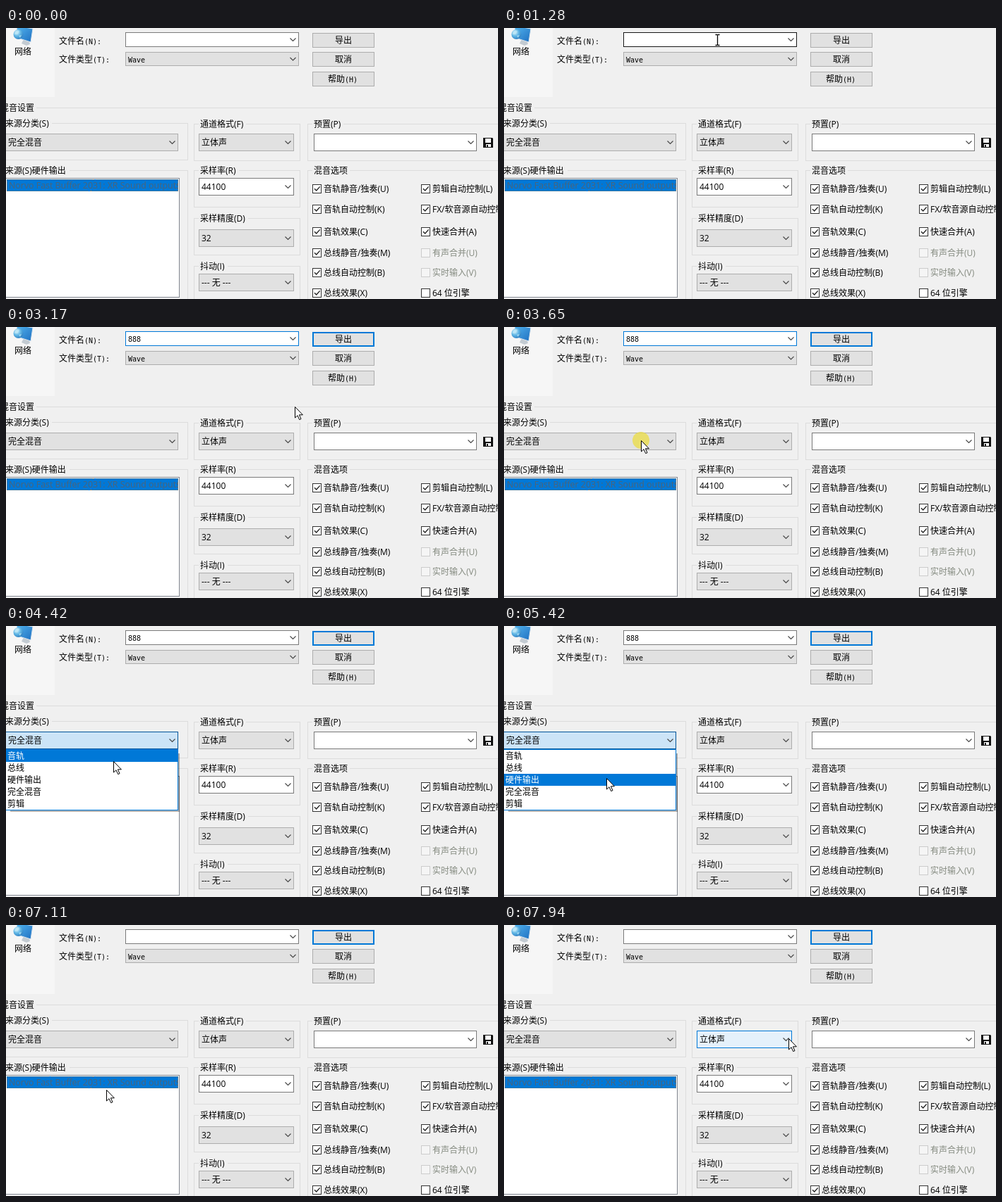
Recreate the animation shown at these times as an HTML page. Size 697 by 385 pixels, loop 8 s.

```html
<!DOCTYPE html>
<html lang="zh-CN">
<head>
<meta charset="utf-8">
<title>导出</title>
<style>
html, body { margin: 0; width: 100%; height: 100%; overflow: hidden; background: #f0f0f0; }
svg { display: block; width: 697px; height: 385px; }
text { font: 12px "Open Sans", "Noto Sans CJK SC", "Noto Sans CJK", "Noto Sans CJK JP", sans-serif; fill: #000; white-space: pre; }
text.mono { font: 12px "Noto Sans CJK SC", "Noto Sans CJK", "Noto Sans CJK JP", sans-serif; }
.mono tspan { font: 10px "DejaVu Sans Mono", monospace; }
rect { shape-rendering: crispEdges; }
</style>
</head>
<body>
<svg id="stage" viewBox="0 0 697 385" xmlns="http://www.w3.org/2000/svg">
  <defs>
    <clipPath id="rowClip"><rect x="0" y="214" width="244" height="20"/></clipPath>
    <radialGradient id="globe" cx=".35" cy=".3" r=".8">
      <stop offset="0" stop-color="#d9f3fd"/><stop offset=".5" stop-color="#5db4e4"/><stop offset="1" stop-color="#2a78bd"/>
    </radialGradient>
    <linearGradient id="screen" x2="1" y2="1">
      <stop offset="0" stop-color="#54b6f0"/><stop offset="1" stop-color="#1f6fc0"/>
    </linearGradient>
  </defs>
  <g id="base"></g>
  <g id="list"></g>
  <g id="top"></g>
</svg>
<script>
const NS = 'http://www.w3.org/2000/svg';
const $ = id => document.getElementById(id);
let layer = $('base');

function el(tag, attrs, parent = layer) {
  const node = document.createElementNS(NS, tag);
  set(node, attrs);
  parent.appendChild(node);
  return node;
}
function set(node, attrs) {
  for (const k in attrs) node.setAttribute(k, attrs[k]);
}
const show = (node, on) => node.setAttribute('visibility', on ? 'visible' : 'hidden');

// Text placed by its vertical middle, on a whole-pixel baseline
function text(x, mid, str, attrs = {}) {
  const node = el('text', { x, y: Math.round(mid + 4.5), ...attrs });
  node.textContent = str;
  return node;
}
// Text in which the Latin part has a fixed pitch
function mono(x, mid, cjk, latin) {
  const node = text(x, mid, cjk, { class: 'mono' });
  const tail = el('tspan', {}, node);
  tail.textContent = latin;
  return tail;
}
// Rectangle with a one pixel border inside x..x2, y..y2
const box = (x, y, x2, y2, fill, stroke) =>
  el('rect', { x: x + .5, y: y + .5, width: x2 - x - 1, height: y2 - y - 1, fill, stroke });
const line = d => el('path', { d, fill: 'none', stroke: '#dcdcdc', 'shape-rendering': 'crispEdges' });
const chevron = (x, y) =>
  el('path', { d: `M${x - 4} ${y - 2}l4 4 4-4`, fill: 'none', stroke: '#444', 'stroke-width': 1.1 });

function combo(x, y, x2, y2, label, white) {
  const frame = box(x, y, x2, y2, white ? '#fff' : '#e1e1e1', white ? '#7a7a7a' : '#adadad');
  const mid = (y + y2) / 2;
  chevron(x2 - 8.5, mid);
  text(Math.max(x, -1) + 4, mid, label);
  return frame;
}
function group(x, y, x2, y2, label, labelEnd) {
  line(`M${x + 7} ${y + .5}H${x + .5}V${y2 + .5}H${x2 + .5}V${y + .5}H${labelEnd + 3}`);
  text(x + 9, y, label);
}
function check(x, mid, label, state = 'on') {
  const off = state === 'disabled';
  box(x, mid - 6.5, x + 13, mid + 6.5, off ? '#f5f5f5' : '#fff', off ? '#ccc' : '#333');
  if (state === 'on')
    el('path', { d: `M${x + 3} ${mid - .2}l2.7 2.7 5-5.6`, fill: 'none', stroke: '#222', 'stroke-width': 1.4 });
  text(x + 16, mid, label, off ? { style: 'fill:#858b80' } : {});
}

// Side bar with the network icon
el('rect', { x: 0, y: 0, width: 69, height: 98, fill: '#f6f6f6' });
el('path', { d: 'M25 16l8 3 1 4-5 2-7-3z', fill: '#c3cbd2' });
el('path', { d: 'M15-3L38 1 35 20 16 14z', fill: 'url(#screen)', stroke: '#dce6ee' });
el('circle', { cx: 17.5, cy: 9, r: 7, fill: 'url(#globe)' });
el('path', { d: 'M13 5q4-3 6 0l-3 4-4 0zM18 11l4-1-2 4z', fill: '#b9e6f6', opacity: .75 });
text(12, 33.5, '网络');

// File name and type
mono(75, 18, '文件名', '(N):');
mono(75, 44, '文件类型', '(T):');
const field = combo(169, 6, 415, 27, '', true);
const typed = mono(173, 16.5, '', '');
const caret = el('rect', { x: 191, y: 10, width: 1, height: 13, fill: '#000' });
combo(169, 34, 415, 54, '');
mono(173, 44, '', 'Wave');

// Buttons
const button = (y, y2) => box(434, y, 522, y2, '#e1e1e1', '#adadad');
const exportBtn = button(7, 28);
button(34, 55);
button(62, 83);
mono(466, 17, '导出', '');
mono(466, 44.5, '取消', '');
mono(456, 72, '帮助', '(H)');

// Groups
text(-8, 113, '混音设置');
line('M43 113.5H697');
group(-10, 135, 257, 187, '来源分类(S)', 62);
group(-10, 202, 257, 390, '来源(S)硬件输出', 87);
group(266, 136, 416, 188, '通道格式(F)', 337);
group(266, 202, 416, 254, '采样率(R)', 327);
group(266, 270, 416, 322, '采样精度(D)', 340);
group(266, 338, 416, 390, '抖动(I)', 311);
group(427, 136, 710, 188, '预置(P)', 475);
group(427, 202, 710, 390, '混音选项', 484);

const source = combo(-5, 150, 244, 175, '完全混音');
const format = combo(273, 150, 408, 175, '立体声');
combo(273, 213, 408, 238, '44100', true);
combo(273, 286, 408, 311, '32');
combo(273, 349, 408, 374, '--- 无 ---');
combo(436, 150, 667, 175, '', true);

// Disk button
el('path', { d: 'M676 156H689L690 157V170H676z', fill: '#111' });
el('rect', { x: 679, y: 157, width: 8, height: 6, fill: '#fff' });
el('rect', { x: 680, y: 165, width: 7, height: 4, fill: '#fff' });
el('rect', { x: 681, y: 166, width: 2, height: 3, fill: '#111' });

// Output list
box(-5, 213, 246, 383, '#fff', '#828790');
const row = el('g', { 'clip-path': 'url(#rowClip)' });
el('rect', { x: 1, y: 215, width: 243, height: 17, fill: '#0078d7' }, row);
el('rect', { x: 1.5, y: 215.5, width: 242, height: 16, fill: 'none', stroke: '#c97a2a', 'stroke-dasharray': '1 1', opacity: .6 }, row);
row.appendChild(text(4, 223.5, 'Norvo Fast Buffer 2031: XR Sound outputs', { style: 'fill:#4d6478;font-size:12.4px' }));

// Options
const rows = [228.5, 257.5, 289.5, 319.5, 347.5, 376.5];
['音轨静音/独奏(U)', '音轨自动控制(K)', '音轨效果(C)', '总线静音/独奏(M)', '总线自动控制(B)', '总线效果(X)']
  .forEach((s, i) => check(434, rows[i], s));
[['剪辑自动控制(L)'], ['FX/软音源自动控制(O)'], ['快速合并(A)'], ['有声合并(U)', 'disabled'], ['实时输入(V)', 'disabled'], ['64 位引擎', 'off']]
  .forEach(([s, state], i) => check(588, rows[i], s, state));

// Drop-down
layer = $('list');
el('rect', { x: 6, y: 262, width: 240, height: 2, fill: '#000', opacity: .3 });
el('rect', { x: 244, y: 181, width: 2, height: 81, fill: '#000', opacity: .3 });
box(-5, 175, 244, 262, '#fff', '#0078d7');
const mark = el('rect', { x: 0, width: 243, height: 17, fill: '#0078d7' });
const items = ['音轨', '总线', '硬件输出', '完全混音', '剪辑'].map((s, i) => text(2, 184.5 + 17 * i, s));

// Pointer
layer = $('top');
const halo = el('circle', { r: 12, fill: '#ecdc3c', opacity: .72 });
const arrow = el('path', { d: 'M.5 .5V16L4 12.7 6.7 18.6 9 17.6 6.4 11.8H11.4z', fill: '#fff', stroke: '#000', 'stroke-linejoin': 'round' });
const beam = el('path', { d: 'M-3-7.5H-1L0-7 1-7.5H3M0-7V7M-3 7.5H-1L0 7 1 7.5H3', fill: 'none', stroke: '#000', 'stroke-width': 1.3 });

// Each move: start, end, from, bend, to
const moves = [
  [650, 1270, 416, 33, 375, -2, 302, 17],
  [3010, 3580, 302, 17, 804, 450, 194, 161],
  [4050, 4410, 194, 161, 170, 172, 152, 192],
  [5150, 5480, 152, 192, 146, 206, 144, 220],
  [5680, 5690, 144, 220, 144, 221, 144, 222],
  [6290, 6540, 144, 222, 143, 230, 142, 234],
  [7180, 7930, 142, 235, 300, 190, 403, 161]
];
function pointer(t) {
  let m = moves[0];
  for (const n of moves) if (t >= n[0]) m = n;
  const [a, b, x0, y0, cx, cy, x1, y1] = m;
  let s = Math.min(1, Math.max(0, (t - a) / (b - a)));
  s = s * s * (3 - 2 * s);
  const bend = (p, q, r) => Math.round(p * (1 - s) ** 2 + 2 * q * s * (1 - s) + r * s * s);
  return [bend(x0, cx, x1), bend(y0, cy, y1)];
}

const LOOP = 8000, STEP = 66.7;
const within = (t, a, b) => t >= a && t < b;

function draw(time) {
  // The picture advances 15 times a second
  const t = Math.floor((time + 7) / STEP) * STEP;
  const [x, y] = pointer(t);
  const inField = x > 169 && x < 397 && y > 5 && y < 28;
  const visible = t >= 650 && !within(t, 2390, 3000);
  const open = within(time, 3860, 6830);

  const focus = within(time, 1670, 3860);
  set(field, { stroke: focus ? '#0078d7' : visible && inField ? '#171717' : '#7a7a7a' });
  const main = time >= 1670;
  set(exportBtn, main
    ? { x: 435, y: 8, width: 86, height: 19, stroke: '#0078d7', 'stroke-width': 2 }
    : { x: 434.5, y: 7.5, width: 87, height: 20, stroke: '#adadad', 'stroke-width': 1 });

  const count = time >= 7040 ? 0 : [2340, 2480, 2550].filter(k => time >= k).length;
  typed.textContent = '8'.repeat(count);
  set(caret, { x: 173 + 6 * count });
  show(caret, within(time, 2340, 3080));

  const pressed = within(time, 3790, 6890), hot = within(time, 3720, 3790);
  set(source, {
    fill: pressed ? '#cce4f7' : hot ? '#e5f1fb' : '#e1e1e1',
    stroke: pressed ? '#005499' : hot ? '#0078d7' : '#adadad'
  });
  const over = visible && x >= 273 && x < 408 && y >= 150 && y < 175;
  set(format, { fill: over ? '#e5f1fb' : '#e1e1e1', stroke: over ? '#0078d7' : '#adadad' });

  show($('list'), open);
  show(row, !within(time, 3860, 6960));
  const pick = y >= 176 ? Math.min(4, Math.floor((y - 176) / 17)) : 3;
  set(mark, { y: 176 + 17 * pick });
  items.forEach((item, i) => { item.style.fill = i === pick ? '#fff' : '#000'; });

  const click = within(time, 1610, 1740) || within(time, 3580, 3720) || within(time, 6690, 6830);
  set(halo, { cx: x, cy: y, r: y < 28 ? 11 : 12 });
  show(halo, click);
  set(arrow, { transform: `translate(${x} ${y})` });
  set(beam, { transform: `translate(${x + .5} ${y})` });
  show(arrow, visible && !inField);
  show(beam, visible && inField);
}

const start = performance.now();
function tick() {
  draw((performance.now() - start) % LOOP);
  requestAnimationFrame(tick);
}
draw(0);
requestAnimationFrame(tick);
</script>
</body>
</html>
```
